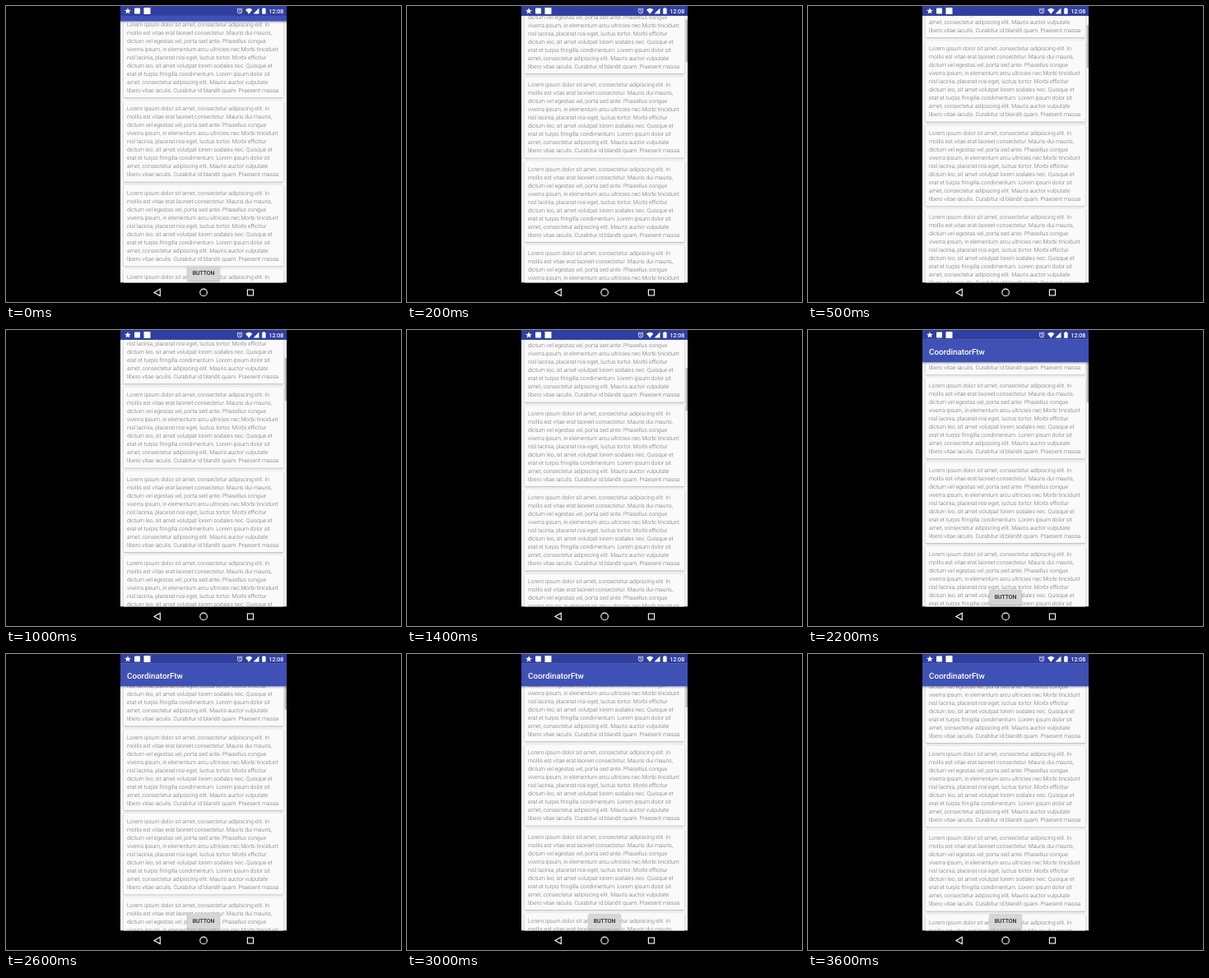
An HTML page with a canvas that plays this animation: 480x360 px, repeating every 3.7 s.

```html
<!DOCTYPE html>
<html lang="en">
<head>
<meta charset="utf-8">
<title>Scrolling cards</title>
<style>
html, body { margin: 0; width: 100%; height: 100%; overflow: hidden; background: #000; }
canvas { display: block; }
</style>
</head>
<body>
<canvas id="stage" width="480" height="360"></canvas>
<script>
const canvas = document.getElementById('stage');
const ratio = window.devicePixelRatio || 1;
canvas.width = 480 * ratio;
canvas.height = 360 * ratio;
canvas.style.width = '480px';
canvas.style.height = '360px';
const ctx = canvas.getContext('2d');
ctx.scale(ratio, ratio);
ctx.textRendering = 'geometricPrecision';

const LOOP = 3700;
const LEFT = 139, WIDTH = 202, STATUS = 11.8, BOTTOM = 336.6;
const BAR = 27.5, PITCH = 102.4, CARD = 98.5, LINE = 10;
const FONT = 'Roboto, "Open Sans", sans-serif';
const TURN = { time: 1600, y: -224.5 };

const lines = [
  'Lorem ipsum dolor sit amet, consectetur adipiscing elit. In',
  'mollis est vitae erat laoreet consectetur. Mauris dui mauris,',
  'dictum vel egestas vel, porta sed ante. Phasellus congue',
  'viverra ipsum, in elementum arcu ultricies nec.Morbi tincidunt',
  'nisl lacinia, placerat nisi eget, luctus tortor. Morbi efficitur',
  'dictum leo, sit amet volutpat lorem sodales nec. Quisque et',
  'erat et turpis fringilla condimentum. Lorem ipsum dolor sit',
  'amet, consectetur adipiscing elit. Mauris auctor vulputate',
  'libero vitae iaculis. Curabitur id blandit quam. Praesent massa'
];

// Time and height of the first text line while the list is dragged
const path = [
  [0, 22.5], [500, -50.5], [1000, -126], [TURN.time, TURN.y], [1800, -206.5],
  [2200, -137.5], [2600, -1.5], [2900, 16], [3300, 19], [LOOP, 19]
];

const clamp = (v, a, b) => Math.min(b, Math.max(a, v));
const ramp = (t, a, b) => clamp((t - a) / (b - a), 0, 1);
const smooth = p => p * p * (3 - 2 * p);
const slope = i => (path[i + 1][1] - path[i][1]) / (path[i + 1][0] - path[i][0]);

function tangent(i) {
  if (i === 0) return slope(0);
  if (i === path.length - 1) return 0;
  const a = slope(i - 1), b = slope(i);
  return a * b <= 0 ? 0 : 2 * a * b / (a + b);
}

function listY(t) {
  let i = 0;
  while (i < path.length - 2 && t > path[i + 1][0]) i++;
  const [t0, y0] = path[i], [t1, y1] = path[i + 1];
  const d = t1 - t0, u = (t - t0) / d, v = 1 - u;
  return y0 * v * v * (1 + 2 * u) + y1 * u * u * (3 - 2 * u) +
    d * u * v * (tangent(i) * v - tangent(i + 1) * u);
}

function rect(x, y, w, h, fill) {
  ctx.fillStyle = fill;
  ctx.fillRect(x, y, w, h);
}

function rounded(x, y, w, h, r, fill) {
  ctx.fillStyle = fill;
  ctx.beginPath();
  ctx.roundRect(x, y, w, h, r);
  ctx.fill();
}

function raised(x, y, w, h, fill) {
  ctx.save();
  ctx.shadowColor = 'rgba(0,0,0,0.32)';
  ctx.shadowBlur = 2 * ratio;
  ctx.shadowOffsetY = 0.7 * ratio;
  rounded(x, y, w, h, 1, fill);
  ctx.restore();
}

function text(str, x, y, size, weight, fill, align = 'left') {
  ctx.font = `${weight} ${size}px ${FONT}`;
  ctx.textAlign = align;
  ctx.textBaseline = 'alphabetic';
  ctx.fillStyle = fill;
  ctx.fillText(str, x, y);
}

function shape(points, fill) {
  ctx.beginPath();
  points.forEach(([x, y]) => ctx.lineTo(x, y));
  ctx.closePath();
  if (fill) {
    ctx.fillStyle = fill;
    ctx.fill();
  } else {
    ctx.stroke();
  }
}

function ring(x, y, r) {
  ctx.beginPath();
  ctx.arc(x, y, r, 0, Math.PI * 2);
  ctx.stroke();
}

function drawCards(y) {
  for (let i = 0; i < 20; i++) {
    const top = y + i * PITCH;
    if (top > BOTTOM + 15) break;
    if (top < -CARD) continue;
    raised(143, top - 9.5, 194, CARD, '#fafafb');
    lines.forEach((s, n) => text(s, 147, top + n * LINE + 2.6, 6.87, 300, '#6c6c6c'));
  }
}

function drawThumb(t, y) {
  const alpha = t < 50 ? 0 : 1 - ramp(t, 3100, 3350);
  rect(338.7, 23 - (y + 50.5) * 0.15, 2.3, 52, `rgba(0,0,0,${0.26 * alpha})`);
}

function drawButton(t) {
  const shown = t < TURN.time ? 1 - smooth(ramp(t, 20, 240)) : smooth(ramp(t, 1830, 2080));
  if (!shown) return;
  const y = 316 + 24 * (1 - shown);
  raised(220.5, y, 39, 18.5, '#d6d6d6');
  text('BUTTON', 240, y + 11.4, 6.87, 500, '#222', 'center');
}

function drawToolbar(t, y) {
  const hidden = t < TURN.time ? 43 - y : BAR - (y - TURN.y);
  const shift = clamp(hidden, 0, BAR);
  const edge = STATUS + BAR - shift;
  if (shift < BAR) {
    const shade = ctx.createLinearGradient(0, edge, 0, edge + 3);
    shade.addColorStop(0, 'rgba(0,0,0,0.25)');
    shade.addColorStop(1, 'rgba(0,0,0,0)');
    rect(LEFT, edge, WIDTH, 3, shade);
  }
  rect(LEFT, STATUS - shift, WIDTH, BAR, '#3f51b5');
  text('CoordinatorFtw', 147, 29.7 - shift, 9.82, 500, '#fff');
}

function drawStatus() {
  rect(LEFT, 0, WIDTH, STATUS, '#303f9f');
  const star = Array.from({ length: 10 }, (_, i) => {
    const a = i * Math.PI / 5, r = i % 2 ? 1.7 : 4.2;
    return [148 + r * Math.sin(a), 6.2 - r * Math.cos(a)];
  });
  shape(star, '#fff');
  rounded(156, 2.5, 7, 7, 1, '#fff');
  rounded(167.5, 2, 8, 8, 0.5, '#fff');

  ctx.strokeStyle = '#fff';
  ctx.lineWidth = 0.8;
  ring(284, 6.3, 2.7);
  ctx.beginPath();
  ctx.moveTo(284, 4.6);
  ctx.lineTo(284, 6.5);
  ctx.lineTo(285.3, 7.3);
  ctx.moveTo(280.7, 4);
  ctx.lineTo(282.4, 2.6);
  ctx.moveTo(285.6, 2.6);
  ctx.lineTo(287.3, 4);
  ctx.stroke();

  ctx.fillStyle = '#fff';
  ctx.beginPath();
  ctx.moveTo(295.2, 9.7);
  ctx.lineTo(291, 4.4);
  ctx.quadraticCurveTo(295.2, 1.2, 299.4, 4.4);
  ctx.fill();
  shape([[300.5, 9.5], [307.5, 9.5], [307.5, 2.5]], '#fff');
  rect(311.2, 3, 4.4, 6.7, '#fff');
  rect(312.5, 2.2, 1.8, 1, '#fff');
  text('12:08', 337.3, 8.6, 7, 500, '#fff', 'right');
}

function drawNav() {
  ctx.strokeStyle = '#fff';
  ctx.lineWidth = 1.1;
  shape([[179.9, 348.4], [187.3, 344.2], [187.3, 352.6]]);
  ring(240.1, 348.4, 4.3);
  ctx.strokeRect(293.4, 345, 7.1, 7);
}

function draw(t) {
  const y = listY(t);
  rect(0, 0, 480, 360, '#000');
  ctx.save();
  ctx.beginPath();
  ctx.rect(LEFT, 0, WIDTH, BOTTOM);
  ctx.clip();
  rect(LEFT, 0, WIDTH, BOTTOM, '#f5f5f6');
  drawCards(y);
  drawThumb(t, y);
  drawButton(t);
  drawToolbar(t, y);
  drawStatus();
  ctx.restore();
  drawNav();
}

const start = performance.now();
function tick() {
  draw((performance.now() - start) % LOOP);
  requestAnimationFrame(tick);
}
tick();
</script>
</body>
</html>
```
